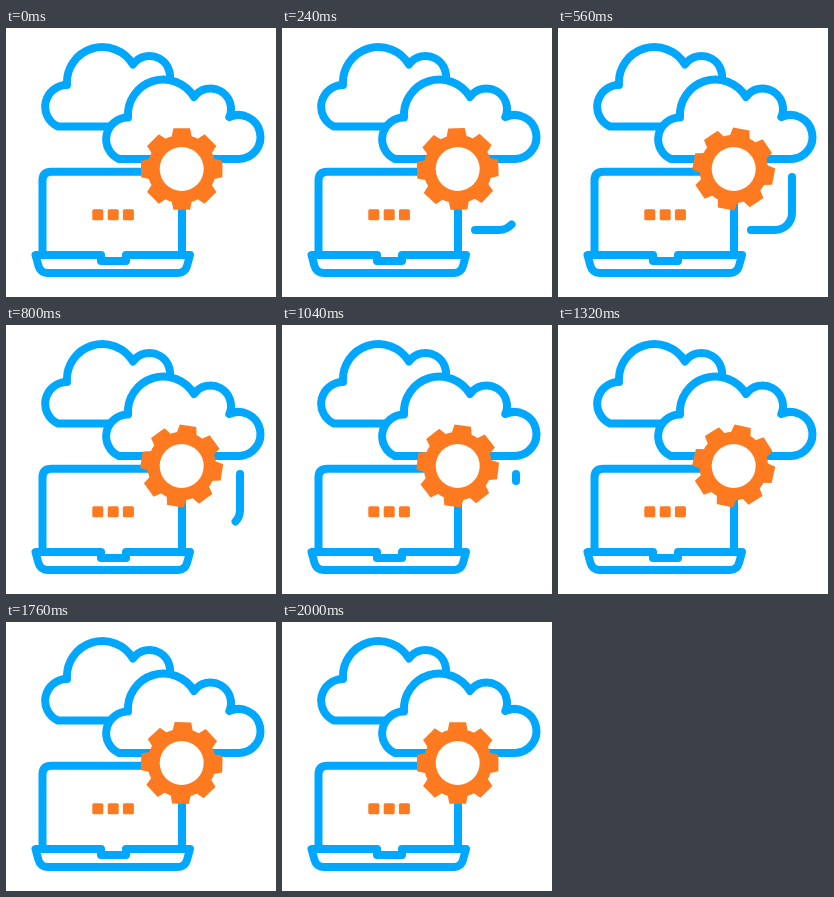
An HTML page that plays this animation: 270x269 px, repeating every 2040 ms.

```html
<!DOCTYPE html>
<html lang="en">
<head>
<meta charset="utf-8">
<title>Cloud computing icon</title>
<style>
  html, body { margin: 0; width: 100%; height: 100%; overflow: hidden; background: #fff; }
  svg { display: block; width: 270px; height: 269px; }
  .line { fill: #fff; stroke: #00a7ff; stroke-width: 8; stroke-linecap: round; stroke-linejoin: round; }
  .accent { fill: #fd7a20; }
</style>
</head>
<body>
<svg viewBox="0 0 270 269">
  <defs>
    <path id="cloud" d="M52 98.5A21.7 21.7 0 0 1 61 57A35.5 35.5 0 0 1 127 36.5A20.4 20.4 0 0 1 162.3 56.5A22 22 0 1 1 172 98.5Z"/>
    <path id="tooth" d="M-10.5 -30L-8.3 -40.7H8.3L10.5 -30Z"/>
    <clipPath id="left"><rect width="168" height="269"/></clipPath>
  </defs>
  <g class="line">
    <g clip-path="url(#left)"><use href="#cloud"/></g>
    <use href="#cloud" x="61" y="32.5"/>
    <path d="M36.5 227V152.5Q36.5 143.7 45.5 143.7H167Q176 143.7 176 152.5V227"/>
    <path d="M29.5 227H95V233H120V227H184L181 238Q179 245 172 245H41.5Q34.5 245 32.5 238Z"/>
    <path id="link" fill="none" pathLength="100" d="M193 202H217A17 17 0 0 0 234 185V149"/>
  </g>
  <g class="accent">
    <rect x="86.3" y="181.2" width="11" height="11" rx="1.5"/>
    <rect x="101.7" y="181.2" width="11" height="11" rx="1.5"/>
    <rect x="116.9" y="181.2" width="11" height="11" rx="1.5"/>
    <g id="gear"><circle r="34.3"/></g>
  </g>
  <circle cx="175.7" cy="141" r="22" fill="#fff"/>
</svg>
<script>
  const LOOP = 2040, FRAME = 40, TURN = 2000;
  const DRAW_AT = 20, ERASE_AT = 580, SWEEP = 500;
  const gear = document.getElementById("gear");
  const link = document.getElementById("link");

  for (let i = 0; i < 8; i++) {
    const tooth = document.createElementNS("http://www.w3.org/2000/svg", "use");
    tooth.setAttribute("href", "#tooth");
    tooth.setAttribute("transform", `rotate(${i * 45})`);
    gear.append(tooth);
  }

  const percent = ms => 100 * Math.min(1, Math.max(0, ms / SWEEP));

  function draw(now) {
    const t = Math.floor((now % LOOP) / FRAME) * FRAME;
    gear.setAttribute("transform", `translate(175.7 141) rotate(${360 * t / TURN})`);

    // The link grows from the laptop, then its tail follows up to the cloud.
    const head = percent(t - DRAW_AT), tail = percent(t - ERASE_AT);
    link.style.display = head > tail ? "" : "none";
    link.setAttribute("stroke-dasharray", `${head - tail} 300`);
    link.setAttribute("stroke-dashoffset", -tail);
  }

  function tick() {
    draw(performance.now());
    requestAnimationFrame(tick);
  }
  tick();
</script>
</body>
</html>
```
